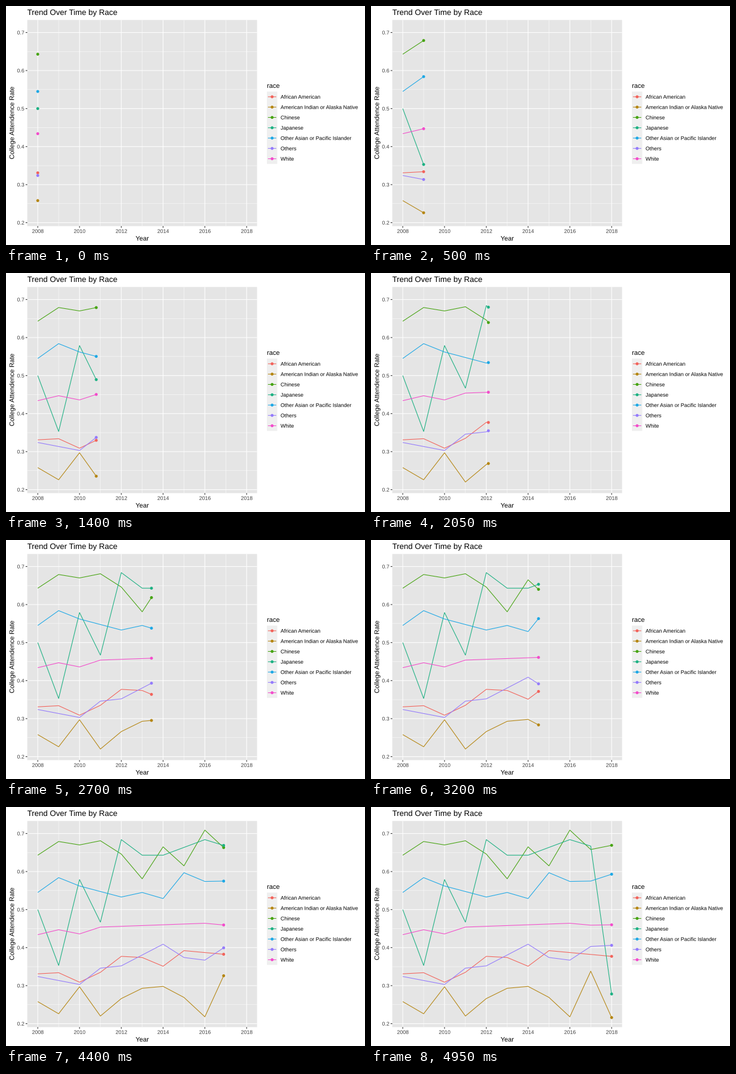
Recreate the animation shown at these times as a matplotlib script. Size 600 by 400 pixels, loop 5000 ms.

```python
import numpy as np
import matplotlib.pyplot as plt
from matplotlib.animation import FuncAnimation
from matplotlib.patches import Circle, PathPatch, Rectangle
from matplotlib.textpath import TextPath
from matplotlib.transforms import Affine2D

plt.rcParams.update({"font.family": "Liberation Sans", "path.snap": False})

W, H, DPI = 600, 400, 100
PT = 72 / DPI                      # points per pixel
FRAMES, INTERVAL = 100, 50
LEFT, RIGHT, TOP, BOTTOM = 35.6, 419.6, 23.4, 368.4
THICK, THIN, RADIUS = 1.07, 0.53, 2.45
TICK = 2.75

YEARS = np.arange(2008, 2019)
_ = np.nan                         # on a straight line between its neighbours
SERIES = {
    "African American":
        ("#F2635B", [.331, .334, .309, .335, .377, .374, .351, .392, _, _, .377]),
    "American Indian or Alaska Native":
        ("#B58612", [.258, .226, .297, .22, .266, .293, .298, .269, .218, .338, .216]),
    "Chinese":
        ("#47A412", [.643, .679, .67, .681, .646, .581, .665, .615, .709, .658, .669]),
    "Japanese":
        ("#1DB183", [.5, .353, .579, .467, .684, .643, .643, _, .684, .667, .278]),
    "Other Asian or Pacific Islander":
        ("#1DA8E5", [.545, .584, .562, _, .533, .545, .529, .597, .574, .575, .593]),
    "Others":
        ("#947BFC", [.324, _, .303, .346, .352, _, .409, .374, .367, .403, .406]),
    "White":
        ("#F34CCB", [.434, .447, .436, .454, _, _, _, _, .464, .459, .46]),
}

# Each year falls on a whole frame, with even motion in between.
STOPS = np.round(np.linspace(0, FRAMES - 1, len(YEARS)))


def to_x(year):
    return 53.06 + (np.asarray(year) - 2008) * 34.91


def to_y(rate):
    return 44.4 + (0.7 - np.asarray(rate)) * 636.4


def fill_gaps(rates):
    rates = np.array(rates)
    known = ~np.isnan(rates)
    return np.interp(YEARS, YEARS[known], rates[known])


fig = plt.figure(figsize=(W / DPI, H / DPI), dpi=DPI, facecolor="white")
ax = fig.add_axes([0, 0, 1, 1])
ax.set_xlim(0, W)
ax.set_ylim(H, 0)
ax.axis("off")


def box(x, y, w, h, color):
    ax.add_patch(Rectangle((x, y), w, h, facecolor=color, linewidth=0))


def stroke(xs, ys, color, width, z):
    return ax.plot(xs, ys, color=color, lw=width * PT, zorder=z,
                   solid_capstyle="butt", solid_joinstyle="round")[0]


def dot(x, y, color, z):
    return ax.add_patch(Circle((x, y), RADIUS, facecolor=color,
                               linewidth=0, zorder=z))


def label(x, y, text, size, color="black", align=0, turn=0):
    """Outline text on a baseline; align is 0 left, 0.5 centre, 1 right."""
    path = TextPath((0, 0), text, size=size)
    shift = -align * path.get_extents().x1
    place = (Affine2D().translate(shift, 0).rotate_deg(turn)
             .scale(1, -1).translate(x, y))
    ax.add_patch(PathPatch(path.transformed(place), facecolor=color,
                           linewidth=0, zorder=7))


def grid_line(xs, ys, major):
    stroke(xs, ys, "white", THICK if major else THIN, 2 + 0.2 * major)


def draw_panel():
    box(LEFT, TOP, RIGHT - LEFT, BOTTOM - TOP, "#E5E5E5")
    for year in YEARS:
        x, major = to_x(year), year % 2 == 0
        grid_line([x, x], [TOP, BOTTOM], major)
        if major:
            stroke([x, x], [BOTTOM, BOTTOM + TICK], "#2B2B2B", THICK, 2.5)
            label(x, 379.8, str(year), 8.8, "#404040", 0.5)
    for step in range(4, 15):
        rate, major = step / 20, step % 2 == 0
        y = to_y(rate)
        grid_line([LEFT, RIGHT], [y, y], major)
        if major:
            stroke([LEFT - TICK, LEFT], [y, y], "#2B2B2B", THICK, 2.5)
            label(30.3, y + 3.15, f"{rate:.1f}", 8.8, "#404040", 1)
    label(35.6, 15, "Trend Over Time by Race", 13.2)
    label((LEFT + RIGHT) / 2, 392.6, "Year", 11, align=0.5)
    label(13.4, (TOP + BOTTOM) / 2, "College Attendence Rate", 11,
          align=0.5, turn=90)


def draw_legend():
    key, x0, y0 = 17.28, 436.1, 143.3
    label(x0, 137, "race", 11)
    box(x0, y0, key, key * len(SERIES), "#EFEFEF")
    for i, (name, (color, rates)) in enumerate(SERIES.items()):
        y = y0 + key * (i + 0.5)
        stroke([x0 + key * 0.1, x0 + key * 0.9], [y, y], color, THICK, 3)
        dot(x0 + key / 2, y, color, 4)
        label(458.9, y + 3.15, name, 8.8)


draw_panel()
draw_legend()
trails = [(fill_gaps(rates), stroke([], [], color, THICK, 5),
           dot(0, 0, color, 6)) for color, rates in SERIES.values()]


def update(frame):
    now = np.interp(frame, STOPS, YEARS)
    past = YEARS < now
    xs = to_x(np.append(YEARS[past], now))
    for rates, line, head in trails:
        ys = to_y(np.append(rates[past], np.interp(now, YEARS, rates)))
        line.set_data(xs, ys)
        head.center = xs[-1], ys[-1]
    return []


anim = FuncAnimation(fig, update, frames=FRAMES, interval=INTERVAL,
                     init_func=lambda: update(0), repeat=True, repeat_delay=0)
plt.show()
```
